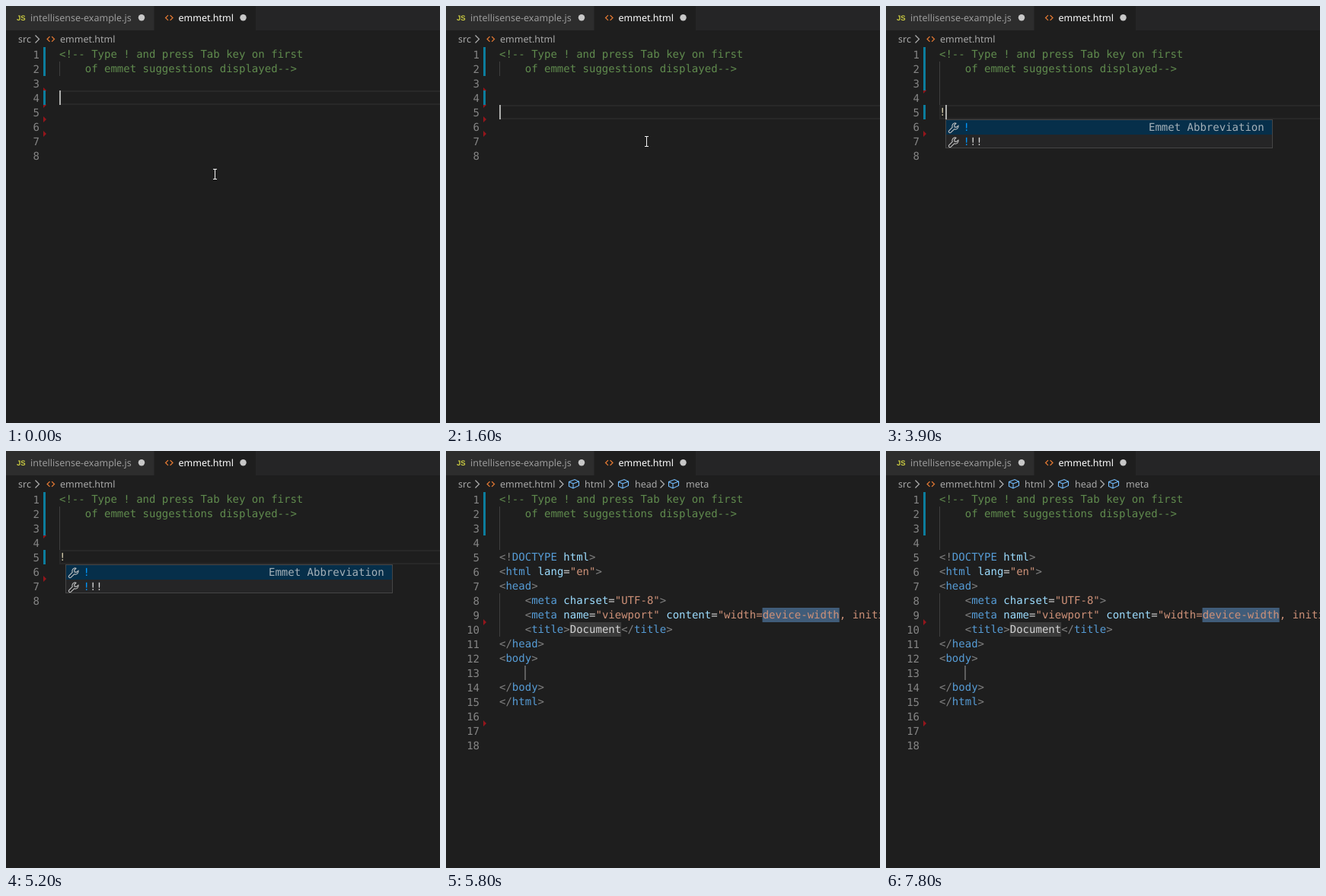
These frames come from a looping animation (570 by 548 pixels, 8100 ms). An HTML page:

```html
<!DOCTYPE html>
<html lang="en">
<head>
<meta charset="UTF-8">
<title>Emmet in the editor</title>
<style>
  html, body { margin: 0; width: 100%; height: 100%; overflow: hidden; background: #1e1e1e; }
  svg { display: block; width: 570px; height: 548px; }
  text { white-space: pre; text-rendering: geometricPrecision; }
  .code { font: 14px "DejaVu Sans Mono", monospace; }
  .ui { font: 12.5px "Noto Sans", "Open Sans", sans-serif; }
</style>
</head>
<body>
<svg id="stage" viewBox="0 0 570 548" xmlns="http://www.w3.org/2000/svg"></svg>
<script>
const LOOP = 8100, STEP = 100;
const LINE = 19, TOP = 54, LEFT = 70, CHAR = 14 * 0.602;
const C = {
  bg: '#1e1e1e', comment: '#608b4e', punct: '#808080', tag: '#569cd6', attr: '#9cdcfe',
  str: '#ce9178', plain: '#d4d4d4', teal: '#0c7d9d', red: '#94151b', crumb: '#a9a9a9',
  match: '#0097fb', caret: '#aeafad', orange: '#e37933'
};
const TYPED = 3700, EXPANDED = 5300, CLICK = 1400;

const HTML = [
  '<!DOCTYPE html>', '<html lang="en">', '<head>',
  '    <meta charset="UTF-8">',
  '    <meta name="viewport" content="width=device-width, initial-scale=1.0">',
  '    <title>Document</title>',
  '</head>', '<body>', '', '</body>', '</html>'
];

const lineTop = n => TOP + (n - 1) * LINE;
const esc = s => s.replace(/&/g, '&amp;').replace(/</g, '&lt;').replace(/>/g, '&gt;');
const rect = (x, y, w, h, fill, more = '') =>
  `<rect x="${x}" y="${y}" width="${w}" height="${h}" fill="${fill}" ${more}/>`;
const text = (cls, x, y, body, fill, more = '') =>
  `<text class="${cls}" x="${x}" y="${y}" fill="${fill}" ${more}>${body}</text>`;
const line = (d, color, width = 1, x = 0, y = 0) =>
  `<path d="${d}" transform="translate(${x} ${y})" fill="none" stroke="${color}" stroke-width="${width}"/>`;
const codeLine = (n, body, fill = C.plain) => text('code', LEFT, lineTop(n) + 14, body, fill);

// Colours one line of HTML.
function paint(src) {
  let inTag = false, wantName = false;
  return src.replace(/"[^"]*"|<[!\/]?|>|=|[\w-]+|\s+/g, tok => {
    let color = C.plain;
    if (tok[0] === '<') { color = C.punct; inTag = wantName = true; }
    else if (tok === '>') { color = C.punct; inTag = false; }
    else if (tok[0] === '"') color = C.str;
    else if (inTag && /\w/.test(tok)) { color = wantName ? C.tag : C.attr; wantName = false; }
    return `<tspan fill="${color}">${esc(tok)}</tspan>`;
  });
}

const angles = (x, y) =>
  line('M-1.3 -3.4L-4.7 0L-1.3 3.4M1.3 -3.4L4.7 0L1.3 3.4', C.orange, 1.3, x, y);
const chevron = x => line('M-2.5 -5L2.5 0L-2.5 5', '#b0b0b0', 1.2, x, 43.5);
const cube = x =>
  line('M1.5 5L9 2L14.5 4.5V10L7 13.5L1.5 11ZL1.5 5L7 7.5L14.5 4.5M7 7.5V13.5', '#75beff', 1.1, x - 8, 35.5);
const wrench = y =>
  line('M9.5 1.8A4 4 0 0 0 6.2 7.3L1.8 11.8a1.7 1.7 0 0 0 2.4 2.4L8.7 9.8A4 4 0 0 0 14 5.2' +
       'L11.5 7.3L9 6.9L8.7 4.5L11 2.2A4 4 0 0 0 9.5 1.8Z', '#c5c5c5', 1.1, 81, y);
const guide = (from, to) =>
  rect(LEFT, lineTop(from), 1, (to - from + 1) * LINE, '#404040');
const group = (id, body) => `<g id="${id}">${body}</g>`;

function tabs() {
  const dot = x => `<circle cx="${x}" cy="15.3" r="4.2" fill="#c8c8c8"/>`;
  return rect(0, 0, 570, 32, '#252526') + rect(0, 0, 194, 32, '#2d2d2d') +
    rect(195, 0, 133, 32, C.bg) +
    text('js', 14, 19, 'JS', '#cbcb41', 'font-family="Liberation Sans, sans-serif" font-size="9.5" font-weight="700"') +
    text('ui', 32, 20, 'intellisense-example.js', '#9b9b9b') + dot(178) +
    angles(214.3, 15.5) + text('ui', 226.5, 20, 'emmet.html', '#ffffff') + dot(311.5);
}

function crumbs() {
  const extra = ['html', 'head', 'meta'].map((name, i) => {
    const x = [168, 233, 299][i];
    return chevron([151.5, 217, 284][i]) + cube(x) + text('ui', x + 14 + i, 48, name, C.crumb);
  }).join('');
  return text('ui', 16, 48, 'src', C.crumb) + chevron(41) + angles(58.8, 43.5) +
    text('ui', 71, 48, 'emmet.html', C.crumb) + group('path', extra);
}

// Change bars as [first, last] lines, deletion marks by the line below them.
function gutter(bars, marks) {
  return marks.map(n =>
      `<path d="M49 ${lineTop(n) - 4}l4 4l-4 4z" fill="${C.red}"/>`).join('') +
    bars.map(([a, b]) => rect(49, lineTop(a), 3, (b - a + 1) * LINE, C.teal)).join('');
}

function popup() {
  const bang = y => text('code', 101.5, y, '!', C.match, 'font-weight="700"');
  return rect(78.5, 149.5, 429, 37, '#252526', 'stroke="#454545"') +
    rect(79, 150, 428, 19, '#062f4a') + wrench(152) + wrench(171) +
    bang(164) + bang(183) + text('code', 345, 164, 'Emmet Abbreviation', '#a4b0b8') +
    text('code', 101.5 + CHAR, 183, '!!', C.plain);
}

function page() {
  const indent = LEFT + 4 * CHAR;
  return rect(indent + 37 * CHAR, lineTop(9), 12 * CHAR, LINE, '#405c79') +
    rect(indent + 7 * CHAR, lineTop(10), 8 * CHAR, LINE, '#3a3a3a') +
    rect(103, lineTop(13), 2, LINE, '#5e5e5e') + guide(8, 10) +
    HTML.map((s, i) => codeLine(i + 5, paint(s))).join('');
}

const numbers = (a, b) => {
  let out = '';
  for (let n = a; n <= b; n++) out += text('code', 44, lineTop(n) + 15, n, '#858585', 'text-anchor="end"');
  return out;
};

const stage = document.getElementById('stage');
stage.innerHTML = rect(0, 0, 570, 548, C.bg) + tabs() + crumbs() +
  `<rect id="current" x="71" width="520" height="17" fill="none" stroke="#282828" stroke-width="2"/>` +
  numbers(1, 8) + group('moreNumbers', numbers(9, 18)) +
  group('marksStart', gutter([[1, 2], [4, 4]], [4, 5, 6, 7])) +
  group('marksTyped', gutter([[1, 3], [5, 5]], [4])) +
  group('marksLow', gutter([], [7])) +
  group('marksDone', gutter([[1, 3]], [10])) +
  group('marksEnd', gutter([], [17])) +
  guide(2, 2) + group('longGuide', guide(3, 4)) +
  codeLine(1, esc('<!-- Type ! and press Tab key on first'), C.comment) +
  codeLine(2, esc('    of emmet suggestions displayed-->'), C.comment) +
  group('bang', codeLine(5, '!', '#d8cfae')) + group('page', page()) + group('popup', popup()) +
  `<rect id="caret" width="2" height="${LINE}" fill="${C.caret}"/>` +
  group('mouse', line('M-2.5 -6.5H2.5M-2.5 6.5H2.5M0 -6.5V6.5', '#f4f4f4'));

const el = {};
stage.querySelectorAll('[id]').forEach(e => el[e.id] = e);
const show = (id, on) => el[id].setAttribute('visibility', on ? 'visible' : 'hidden');

const MOUSE = [
  [0, 274.5, 221], [100, 224.5, 172], [200, 192.5, 148], [500, 188.5, 137], [900, 187.5, 133],
  [1000, 187.5, 133], [1100, 186.5, 133], [1400, 186.5, 133], [1500, 214.5, 150],
  [1600, 263.5, 178], [1700, 348.5, 214], [1800, 474.5, 258]
];

function mouseAt(t) {
  const i = Math.max(1, MOUSE.findIndex(p => p[0] >= t));
  const [t0, x0, y0] = MOUSE[i - 1], [t1, x1, y1] = MOUSE[i];
  const k = (t - t0) / (t1 - t0);
  return [Math.floor(x0 + (x1 - x0) * k) + 0.5, Math.round(y0 + (y1 - y0) * k)];
}

// Caret place, and whether the blink is in its lit half.
function caretAt(t) {
  const lit = since => Math.floor((t - since) / 500) % 2 === 0;
  if (t < CLICK) return [LEFT, 4, t < 200 || t >= 700];
  if (t < TYPED) return [LEFT, 5, lit(CLICK)];
  if (t < EXPANDED) return [78, 5, lit(TYPED)];
  return [516, 9, lit(EXPANDED)];
}

function draw(now) {
  const t = Math.floor((now % LOOP) / STEP) * STEP;
  const done = t >= EXPANDED;

  const [x, row, lit] = caretAt(t);
  el.caret.setAttribute('x', x);
  el.caret.setAttribute('y', lineTop(row));
  show('caret', lit);
  el.current.setAttribute('y', lineTop(row) + 1);
  show('current', !done);

  const pointing = t <= 1800;
  show('mouse', pointing);
  if (pointing) el.mouse.setAttribute('transform', `translate(${mouseAt(t).join(' ')})`);

  show('bang', t >= TYPED && !done);
  show('popup', t >= TYPED && !done);
  show('longGuide', t >= TYPED);
  show('page', done);
  show('moreNumbers', done);
  show('path', t >= 5700);

  show('marksStart', t < 3900);
  show('marksTyped', t >= 3900 && t < 5600);
  show('marksLow', t >= 3900 && !done);
  show('marksDone', t >= 5600);
  show('marksEnd', done);
}

const start = performance.now();
function tick() {
  draw(performance.now() - start);
  requestAnimationFrame(tick);
}
tick();
</script>
</body>
</html>
```
